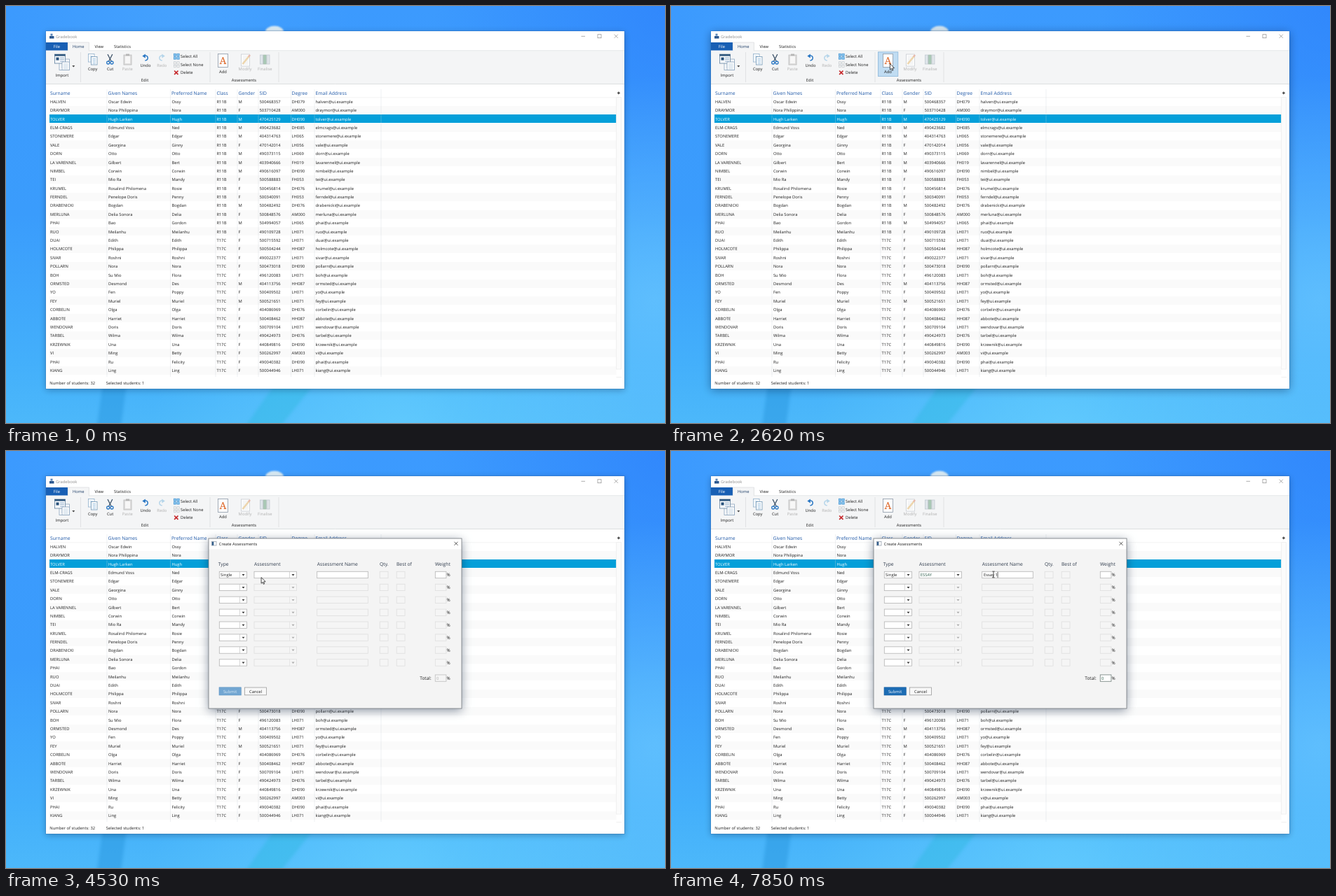
Write an HTML page with a canvas that moves like this. It is 940x596 px and loops after 8000 ms.

```html
<!DOCTYPE html>
<html lang="en">
<head>
<meta charset="utf-8">
<title>Gradebook</title>
<style>
  html, body { margin: 0; width: 100%; height: 100%; overflow: hidden; }
  canvas { display: block; }
</style>
</head>
<body>
<canvas id="stage" width="940" height="596"></canvas>
<script>
const ctx = document.getElementById('stage').getContext('2d');
const LOOP = 8000, STEPS = 104, STEP = LOOP / STEPS;
const ACCENT = '#049fd9', INK = '#1e1e1e', FAINT = '#b0b0b0';

// surname | given | preferred (blank: same as given) | gender | SID | degree
const students = `HALVEN|Oscar Edwin|Ossy|M|500468357|DH079
DRAYMOR|Nora Philippina|Nora|F|503710428|AM000
TOLVER|Hugh Larken|Hugh|M|470425129|DH090
ELM-CRAGS|Edmund Voss|Ned|M|490423682|DH085
STONEMERE|Edgar||M|404314763|LH065
VALE|Georgina|Ginny|F|470142014|LH056
DORN|Otto||M|490373115|LH069
LA VARENNEL|Gilbert|Bert|M|403940666|FH019
NIMBEL|Corwin||M|490616097|DH090
TEI|Mio Ra|Mandy|F|500588883|FH053
KRUMEL|Rosalind Philomena|Rosie|F|500456814|DH076
FERNDEL|Penelope Doris|Penny|F|500340091|FH053
DRABENICKI|Bogdan||M|500482492|DH076
MERLUNA|Delia Sonora|Delia|F|500848576|AM000
PHAI|Bao|Gordon|M|504994057|LH065
RUO|Meilanhu||F|490109728|LH071
DUAI|Edith||F|500715592|LH071
HOLMCOTE|Philippa||F|500504244|HH087
SIVAR|Roshni||F|490022377|LH071
POLLARN|Nora||F|500473018|DH090
BOH|Su Mio|Flora|F|496120083|LH071
ORMSTED|Desmond|Des|M|404113756|HH087
YO|Fen|Poppy|F|500409502|LH071
FEY|Muriel||M|500521651|LH071
CORBELIN|Olga||F|404086969|DH076
ABBOTE|Harriet||F|500408462|HH087
WENDOVAR|Doris||F|500709104|LH071
TARBEL|Wilma||F|490424973|DH076
KRZEWNIK|Una||F|440849816|DH090
VI|Ming|Betty|F|500262997|AM003
PHAI|Ru|Felicity|F|490040382|DH090
KIANG|Ling||F|500044946|LH071`.split('\n').map((line, i) => {
  const [surname, given, preferred, gender, sid, degree] = line.split('|');
  const email = surname.toLowerCase().replace(/[^a-z]/g, '') + '@ui.example';
  return [surname, given, preferred || given, i < 16 ? 'R11B' : 'T17C', gender, sid, degree, email];
});
const columns = [['Surname', 63], ['Given Names', 145.5], ['Preferred Name', 236], ['Class', 300.5],
  ['Gender', 331.5], ['SID', 361.5], ['Degree', 407.5], ['Email Address', 441.5]];
const kinds = ['ESSAY', 'ESSAY_PLAN', 'EXAM', 'QUIZ', 'ARG_ANALYSIS', 'PARTICIPATION', 'PRESENTATION', 'OTHER'];

// ---------- helpers ----------
const clamp = v => Math.max(0, Math.min(1, v));

// y is the middle of the capitals; the type is set large and scaled for exact advances
function text(s, x, y, color = INK, size = 5.85, align = 'left', family = '"Open Sans", sans-serif') {
  ctx.save();
  ctx.translate(x, y + size * 0.36);
  ctx.scale(0.1, 0.1);
  ctx.font = `${size * 10}px ${family}`;
  ctx.textRendering = 'geometricPrecision';
  ctx.textAlign = align;
  ctx.fillStyle = color;
  ctx.fillText(s, 0, 0);
  ctx.restore();
}
function rect(x, y, w, h, fill, stroke, lw = 0.8) {
  if (fill) { ctx.fillStyle = fill; ctx.fillRect(x, y, w, h); }
  if (stroke) { ctx.strokeStyle = stroke; ctx.lineWidth = lw; ctx.strokeRect(x, y, w, h); }
}
function path(points, fill, stroke, lw = 0.8) {
  ctx.beginPath();
  for (let i = 0; i < points.length; i += 2) ctx.lineTo(points[i], points[i + 1]);
  if (fill) { ctx.closePath(); ctx.fillStyle = fill; ctx.fill(); }
  if (stroke) { ctx.strokeStyle = stroke; ctx.lineWidth = lw; ctx.stroke(); }
}
function arc(x, y, r, a, b, stroke, lw) {
  ctx.beginPath();
  ctx.arc(x, y, r, a, b);
  ctx.strokeStyle = stroke; ctx.lineWidth = lw;
  ctx.stroke();
}
const caret = (x, y, color = '#444') => path([x - 2, y - 1.1, x + 2, y - 1.1, x, y + 1.3], color);
function cross(x, y, r, color, lw) {
  path([x - r, y - r, x + r, y + r], null, color, lw);
  path([x + r, y - r, x - r, y + r], null, color, lw);
}
// only the part outside the box, so that a fading panel stays clean
function shadow(x, y, w, h, blur, alpha, dy) {
  ctx.save();
  ctx.beginPath();
  ctx.rect(0, 0, 940, 596);
  ctx.rect(x, y, w, h);
  ctx.clip('evenodd');
  ctx.shadowColor = `rgba(0,20,50,${alpha})`;
  ctx.shadowBlur = blur;
  ctx.shadowOffsetY = dy;
  rect(x, y, w, h, '#fff');
  ctx.restore();
}
function page(x, y, w, h, edge, lines) {
  rect(x, y, w, h, '#fdfdfd', edge);
  for (let ly = y + 3; ly < y + h - 1.5; ly += 2.2) path([x + 2, ly, x + w - 2, ly], null, lines, 0.7);
}

// ---------- desktop ----------
function glow(x, y, r, rgb, alpha) {
  const g = ctx.createRadialGradient(x, y, 0, x, y, r);
  g.addColorStop(0, `rgba(${rgb},${alpha})`);
  g.addColorStop(1, `rgba(${rgb},0)`);
  rect(0, 0, 940, 596, g);
}
function desktop() {
  const g = ctx.createLinearGradient(0, 0, 0, 596);
  [[0, '#3c9afe'], [0.5, '#3a9cfc'], [0.85, '#43affb'], [1, '#4cb8fa']].forEach(s => g.addColorStop(...s));
  rect(0, 0, 940, 596, g);
  glow(940, 0, 330, '38,118,250', 0.5);
  glow(925, 420, 320, '110,202,255', 0.65);
  glow(560, 610, 350, '106,210,255', 0.65);
  glow(250, 0, 240, '90,180,255', 0.25);
  ctx.save();
  ctx.filter = 'blur(2px)';
  path([138, 540, 172, 540, 164, 600, 130, 600], 'rgba(40,150,222,.5)');
  path([384, 540, 440, 540, 392, 600, 342, 600], 'rgba(50,185,228,.5)');
  ctx.filter = 'blur(1px)';
  ctx.fillStyle = '#dcecf5';
  ctx.beginPath(); ctx.ellipse(383, 37, 13, 8.5, 0, 0, 7); ctx.fill();
  ctx.restore();
}

// ---------- main window ----------
function ribbonIcons() {
  const blue = '#2b78c4';
  // import
  page(76, 76, 14.5, 15.5, '#8aa4bd', '#c9d6e2');
  rect(69.5, 69, 15, 13, '#f8fafc', '#5f7f9d');
  rect(69.5, 69, 15, 2.5, '#2d557c');
  rect(71.5, 73.5, 4, 4, '#27517b');
  for (const y of [74, 76.3, 79]) path([77, y, 83, y], null, '#7fa0bf', 0.8);
  page(80, 80, 10.5, 11.5, '#8aa4bd', '#a9c4dc');
  caret(96.3, 86.2);
  // copy, cut, paste
  page(117.5, 68.5, 8.5, 11.5, '#8fb0cb', '#a9cbe5');
  page(121.5, 72.5, 8.5, 11.5, '#7398b7', '#7db0da');
  path([145, 69, 150.2, 79], null, '#3c5268', 1.3);
  path([151.8, 69, 146.6, 79], null, '#3c5268', 1.3);
  arc(145.7, 81, 2, 0, 7, blue, 1.3);
  arc(151, 81, 2, 0, 7, blue, 1.3);
  rect(168, 70, 11, 14, '#dedede', '#b9b9b9');
  rect(170, 72, 7, 10, '#f7f7f7');
  rect(171, 68.5, 5, 2.5, '#b5b5b5');
  // undo, redo
  for (const [x, dir, color] of [[198.8, 1, blue], [222.3, -1, '#b5d5ea']]) {
    ctx.save();
    ctx.translate(x, 74); ctx.scale(dir, 1);
    arc(0, 0.3, 3.4, -2.2, 1.7, color, 1.6);
    path([-4.5, -2.6, 0, -5.4, 0, 0.4], color);
    ctx.restore();
  }
  // selection commands
  for (let i = 0; i < 4; i++) {
    const x = 239.3 + (i % 2) * 4.6, y = 68.2 + (i >> 1) * 4.6;
    rect(x, y, 3.3, 3.3, '#8cc8f0', '#3b8fd0', 0.7);
    rect(x, y + 11.5, 3.3, 3.3, '#f1f1f1', '#bdc3c8', 0.6);
  }
  cross(242.8, 95.2, 2.7, '#c6282b', 1.7);
  // assessments
  rect(302.5, 68.5, 14, 19, '#fdfdfd', '#8d9aa8');
  text('A', 309.5, 78, '#dc5f1e', 14, 'center', '"Noto Serif", serif');
  page(335.5, 69, 12, 17, '#c9ced3', '#e1e4e7');
  path([337.5, 83, 346.5, 72], null, '#edd6ae', 2.6);
  path([346, 72.5, 348, 70], null, '#e8b9ac', 2.6);
  rect(362.5, 70, 4, 13, '#dfe5ea', '#bcc5cd', 0.7);
  rect(367.2, 70, 4, 13, '#a9c9b5', '#a5b9ad', 0.7);
  rect(372, 70, 4, 13, '#e1e5e9', '#bcc5cd', 0.7);
}
function ribbon(addState) {
  rect(57, 64, 825, 47.5, '#f4f5f6');
  path([118, 63.7, 882, 63.7], null, '#dfe1e3');
  path([57, 111.5, 882, 111.5], null, '#d6d8da');
  rect(57, 52, 31, 11.5, '#185fb4');
  rect(88.4, 52, 30, 12.4, '#f4f5f6');
  path([88.4, 64, 88.4, 52, 118.4, 52, 118.4, 64], null, '#dcdee0');
  text('File', 72.5, 58, '#fff', 5.85, 'center');
  text('Home', 103.3, 58, '#1d3d66', 5.85, 'center');
  text('View', 132.8, 58, INK, 5.85, 'center');
  text('Statistics', 154, 58);
  for (const x of [106.5, 291, 389]) path([x, 66, x, 109], null, '#dcdee0');
  if (addState) rect(295.5, 65.8, 28.3, 34.6, addState === 2 ? '#c0dcf2' : '#dce9f4', addState === 2 ? '#8ab6da' : '#abcbe5');
  ribbonIcons();
  for (const [s, x, y, off] of [['Import', 80, 98.7], ['Copy', 123.7, 90], ['Cut', 148.6, 89.8], ['Paste', 173.3, 89.8, 1],
    ['Undo', 199, 84.5], ['Redo', 222.3, 84.5, 1], ['Edit', 198, 106.2], ['Add', 309.5, 94],
    ['Modify', 341, 89.8, 1], ['Finalise', 369.3, 89.8, 1], ['Assessments', 339.5, 106.2]])
    text(s, x, y, off ? FAINT : INK, 5.85, 'center');
  ['Select All', 'Select None', 'Delete'].forEach((s, i) => text(s, 249, 72.3 + i * 11.5));
}
function table() {
  for (const [name, x] of columns) text(name, x, 125, '#1c56a6', 6.75);
  path([62, 130.7, 870, 130.7], null, '#ededed', 0.6);
  students.forEach((row, i) => {
    const y = 136.7 + i * 12.39, selected = i === 2;
    if (selected || i % 2) rect(62, Math.round(y - 6.2), 808.5, 12, selected ? ACCENT : '#fafafa');
    row.forEach((s, c) => text(s, columns[c][1] + (c === 1 || c === 2 ? 0.4 : 0), y, selected ? '#fff' : INK));
  });
  for (const x of [144, 234.5, 299, 330, 360, 406.5, 440, 535]) path([x, 119, x, 530], null, 'rgba(205,210,215,.45)', 0.7);
  rect(870.7, 130.5, 6.8, 388.5, '#fbfbfb', '#eaeaea', 0.7);
  path([870.5, 530.5, 878, 530.5], null, '#ececec');
  path([872, 124.3, 875.8, 124.3], null, '#333', 1.2);
  path([873.9, 122.4, 873.9, 126.2], null, '#333', 1.2);
}
function mainWindow(t) {
  const active = t >= 2000 && t < 2760;
  shadow(57, 36, 825, 511, active ? 12 : 9, active ? 0.42 : 0.32, 2);
  rect(57, 36, 825, 511, '#fff');
  rect(56.6, 35.6, 825.8, 511.8, null, 'rgba(50,100,160,.35)', 0.8);
  path([62, 46.5, 62, 43, 68.5, 43, 68.5, 46.5], '#29568f');
  rect(63.5, 39.6, 3, 3, '#5a86b8');
  text('Gradebook', 71, 43.4, '#8b8b8b');
  path([820.5, 43.3, 826, 43.3], null, '#8a8a8a', 0.7);
  rect(844, 40.7, 5, 5, null, '#8a8a8a', 0.7);
  cross(870.3, 43.2, 2.6, '#8a8a8a', 0.7);
  ribbon(t < 840 ? 0 : t < 2000 ? 1 : t < 2685 ? 2 : 0);
  table();
  text('Number of students: 32', 62.3, 538.5);
  text('Selected students: 1', 142.7, 538.5);
}

// ---------- dialog ----------
function field(x, y, w, on) {
  rect(x, y - 4.7, w, 9.4, on ? '#fff' : '#f5f5f5', on ? '#b4b4b4' : '#dedede', 0.8);
}
function combo(x, y, w, on, value) {
  field(x, y, w, on);
  path([x + w - 10, y - 4.7, x + w - 10, y + 4.7], null, on ? '#c4c4c4' : '#e0e0e0', 0.7);
  caret(x + w - 5, y + 0.2, on ? '#333' : '#aaa');
  if (value) text(value, x + 1.8, y, value === 'ESSAY' ? '#2c5d4b' : INK);
}
function popup(x, w, items, hover) {
  const h = items.length * 8.83 + 2.6;
  shadow(x, 182, w, h, 5, 0.45, 1.5);
  rect(x, 182, w, h, '#fff', '#c6c6c6', 0.6);
  items.forEach((s, i) => {
    const y = 187.3 + i * 8.83;
    if (i === hover) rect(x + 0.5, y - 4.4, w - 1, 8.8, ACCENT);
    text(s, x + 2, y + 0.1, i === hover ? '#fff' : INK);
  });
}
function dialog(t) {
  const p = clamp((t - 2730) / 240);
  if (!p) return;
  const ease = 1 - (1 - p) ** 3, scale = 0.95 + 0.05 * ease;
  const typed = t >= 4380, chosen = t >= 5610;
  ctx.save();
  ctx.translate(469.5, 246.5); ctx.scale(scale, scale); ctx.translate(-469.5, -246.5);
  ctx.globalAlpha = ease;
  shadow(289, 125, 361, 243, 13, 0.45, 3);
  rect(289, 125, 361, 243, '#f4f4f4');
  rect(289, 125, 361, 15.5, '#fff');
  rect(289, 125, 361, 243, null, '#74797e', 0.8);
  rect(293.5, 129.5, 6.5, 5.5, '#fff', '#8c98a5', 0.7);
  rect(293.8, 129.8, 2.5, 5, '#345f8c');
  text('Create Assessments', 303.7, 132.7);
  cross(642, 132.3, 2.5, '#333', 0.8);
  for (const [s, x] of [['Type', 302.7], ['Assessment', 354], ['Assessment Name', 443.7], ['Qty.', 533], ['Best of', 557], ['Weight', 612]])
    text(s, x, 161.8, '#2f3b4c', 6.75);
  for (let i = 0; i < 8; i++) {
    const y = 177 + i * 17.92, on = typed && !i;
    combo(304.3, y, 39.2, true, on && 'Single');
    combo(354, y, 60.5, on, on && chosen && 'ESSAY');
    field(443.7, y, 72.6, on);
    field(533.2, y, 11.8, false);
    field(557.2, y, 11.8, false);
    field(612.3, y, 15.6, on);
    text('%', 628.6, y, INK, 6.3);
  }
  text('Total:', 606.8, 324.6, INK, 6.6, 'right');
  rect(612.3, 319.9, 15.6, 9.4, chosen ? '#fff' : '#f5f5f5', chosen ? '#7d8a86' : '#c4c4c4', 0.9);
  text('0', 613.9, 324.6, chosen ? '#2c5d4b' : FAINT);
  text('%', 628.6, 324.6, INK, 6.3);
  rect(304, 337.8, 31.3, 11.2, chosen ? '#1c6cb4' : '#72a6d2', chosen ? '#185f9f' : '#6296c2', 0.6);
  text('Submit', 319.6, 343.5, chosen ? '#fff' : '#dceaf5', 5.85, 'center');
  rect(340.5, 338, 31, 10.8, '#f8f8f8', '#9c9c9c', 0.8);
  text('Cancel', 356, 343.5, INK, 5.85, 'center');
  if (t >= 3530 && t < 4380) popup(304.3, 39.2, ['Single', 'Set'], t >= 3915 ? 0 : -1);
  if (t >= 4840 && t < 5610) popup(354, 60.5, kinds, t >= 5145 ? 0 : -1);
  typing(t);
  ctx.restore();
}
function typing(t) {
  if (t < 6060) return;
  const count = [6450, 6690, 6830, 7070, 7140, 7620, 7850].filter(k => t >= k - 8).length;
  const s = 'Essay 1'.slice(0, count);
  text(s, 445.9, 177);
  ctx.font = '58.5px "Open Sans", sans-serif';
  const x = 446.2 + ctx.measureText(s).width / 10;
  path([x, 172.8, x, 181.2], null, '#222', 0.7);
}

// ---------- pointer ----------
const route = [[77, 888, 586], [846, 318, 83], [1000, 312, 81], [2460, 312, 81], [2615, 312.4, 82.5], [2846, 313.2, 85],
  [3231, 335, 171], [3615, 337.8, 177], [3846, 337.8, 177], [4000, 317, 186], [4380, 317, 186], [4692, 409, 175.5],
  [5077, 409, 175.5], [5308, 389.7, 184.6], [5615, 389.7, 184.6], [6077, 460, 176.5], [8000, 460, 176.5]];
function pointer(t) {
  if (t < 70) return;
  const i = Math.max(1, route.findIndex(k => k[0] >= t));
  const [t0, x0, y0] = route[i - 1], [t1, x1, y1] = route[i];
  const p = clamp((t - t0) / (t1 - t0)), e = p * p * (3 - 2 * p);
  const x = x0 + (x1 - x0) * e, y = y0 + (y1 - y0) * e;
  ctx.save();
  ctx.translate(x, y);
  if (t > 5700 && x > 443) {
    path([0, -4.2, 0, 4.2], null, '#222', 0.8);
    for (const d of [-4.4, 4.4]) path([-1.7, d, 1.7, d], null, '#222', 0.7);
  } else {
    const shape = [0, 0, 0, 8.6, 2, 6.8, 3.3, 9.7, 4.6, 9.1, 3.4, 6.3, 6.1, 6.1, 0, 0];
    path(shape, '#fff', '#111', 0.75);
  }
  ctx.restore();
}

let shown = -1;
function frame(now) {
  const step = Math.floor((now % LOOP + 8) / STEP) % STEPS;
  if (step !== shown) {
    shown = step;
    const t = step * STEP;
    desktop();
    mainWindow(t);
    dialog(t);
    pointer(t);
  }
  requestAnimationFrame(frame);
}
requestAnimationFrame(frame);
</script>
</body>
</html>
```
